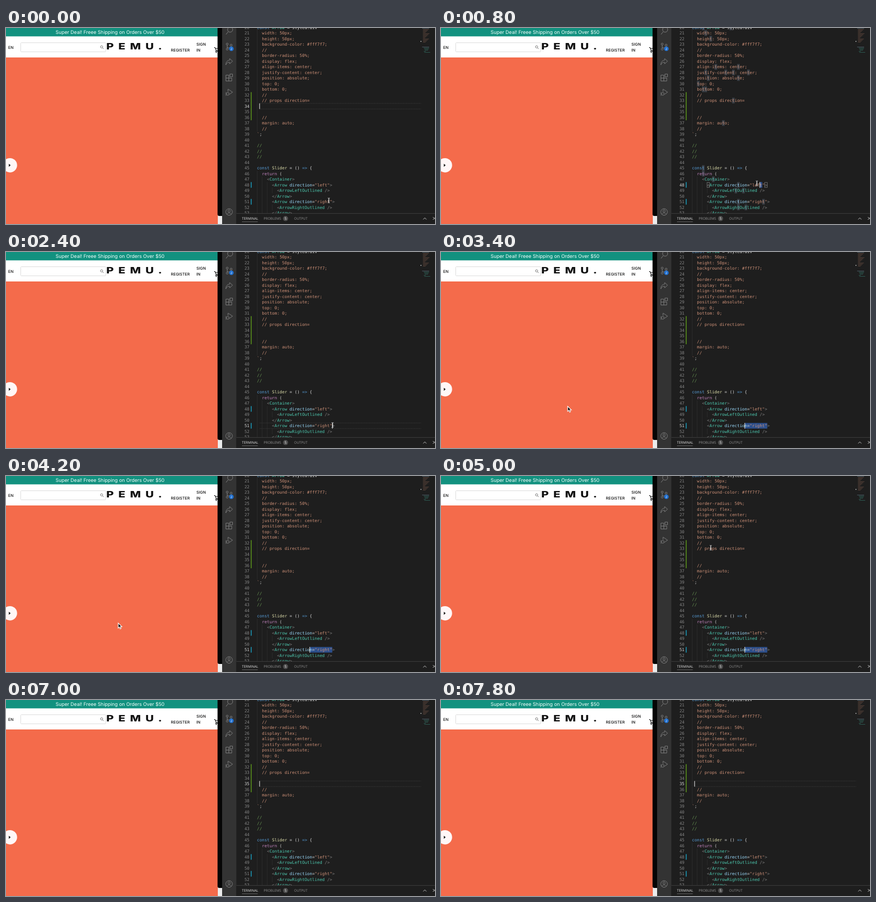
An HTML page that plays this animation: 800 by 366 pixels, repeating every 8000 ms.

```html
<!DOCTYPE html>
<html lang="en">
<head>
<meta charset="utf-8">
<title>Shop slider in the editor</title>
<style>
  html, body { margin: 0; width: 100%; height: 100%; overflow: hidden; background: #1e1e1e; }
  svg { display: block; width: 100vw; height: 100vh; }
  text { white-space: pre; text-rendering: geometricPrecision; }
  .ui { font-family: Inter, sans-serif; font-size: 7.3px; font-weight: 500; fill: #111; }
  .code { font-family: "DejaVu Sans Mono", monospace; font-size: 7.774px; }
  .tab { font-family: "Open Sans", sans-serif; font-size: 6.3px; fill: #969696; }
  .icon { fill: none; stroke: #7c7c7c; stroke-width: 1; stroke-linejoin: round; }
</style>
</head>
<body>
<svg viewBox="0 0 800 366" preserveAspectRatio="none">
  <g id="shop">
    <rect width="395" height="366" fill="#f46b4b"/>
    <rect width="395" height="55" fill="#fff"/>
    <rect width="395" height="15.6" fill="#12917f"/>
    <text class="ui" x="194" y="11.2" text-anchor="middle" style="font-size:9px;font-weight:400;fill:#f4fffc">Super Deal! Freee Shipping on Orders Over $50</text>
    <text class="ui" x="4" y="38.6">EN</text>
    <rect x="27.5" y="27.5" width="158.5" height="17" rx="1" fill="#fff" stroke="#dcdcdc"/>
    <g fill="none" stroke="#777"><circle cx="178.3" cy="35.2" r="2.1"/><path d="M179.9 36.8l2.3 2.3"/></g>
    <text class="ui" transform="translate(187 40) scale(1.3 1)" style="font-size:16.5px;font-weight:800;letter-spacing:6.6px">PEMU.</text>
    <text class="ui" x="307.5" y="44.2">REGISTER</text>
    <text class="ui" x="355" y="32.7">SIGN</text>
    <text class="ui" x="355" y="44.2">IN</text>
    <path d="M388 36.5h1.8l2.2 5.5h4M390.5 38.3h5M392 42l-1 1.7h5" fill="none" stroke="#111" stroke-width="1.1"/>
    <circle cx="392" cy="45.6" r="1" fill="#111"/>
    <circle cx="7.3" cy="256.3" r="13.4" fill="#fff7f7"/>
    <path d="M5.3 253.4v5.8l3.3-2.9z" fill="#111"/>
    <rect x="395" y="340" width="8" height="26" fill="#ececec"/>
    <path d="M394.5 0h8.500v351h-5a3.500 3.500 0 0 1-3.500-3.500z" fill="#050505"/>
  </g>
  <rect x="403" width="27" height="366" fill="#333"/>
  <rect x="429.5" width="371" height="366" fill="#1e1e1e"/>
  <g class="icon">
    <path d="M414.3 7l-4 5"/><circle cx="418" cy="3" r="4.8"/>
    <circle cx="412.5" cy="30" r="1.8"/><circle cx="419.8" cy="32" r="1.8"/><circle cx="412.5" cy="39.5" r="1.8"/>
    <path d="M412.5 32v5.5M419.8 34c0 3-4 3-7.3 3"/>
    <path d="M417 57l5.5 5-5.5 5v-3c-4 0-6 1.5-7 5 0-6 3-8.5 7-9z"/>
    <path d="M410 88h5.5v5.5h5.5v5.5h-11zM410 93.5h5.5v5.5M417.5 86h5v5h-5z"/>
    <path d="M414 119v-5l8.5 5.8-6 4.2"/><circle cx="413.5" cy="123" r="2.6"/>
    <path d="M409.5 120.5l1.8 1M409.5 126l1.8-1M409 123.2h2"/>
    <circle cx="416" cy="343.5" r="6.2"/><circle cx="416" cy="341.7" r="2.2"/><path d="M411.8 348c1-3.600 7.400-3.600 8.400 0"/>
  </g>
  <circle cx="420.3" cy="38.7" r="4.3" fill="#1f6fd0"/>
  <text class="tab" x="420.3" y="40.7" text-anchor="middle" style="font-size:5.5px;fill:#fff">2</text>
  <g id="guides" stroke="#363636" stroke-width=".6"></g>
  <g id="marks"></g>
  <g id="code" class="code"></g>
  <rect id="caret" width="1.2" height="10.5" fill="#d4d4d4"/>
  <g id="map" opacity=".5"></g>
  <rect x="773" y="24" width="1.500" height="2" fill="#aaa"/>
  <g id="panel">
    <rect x="429.5" y="346" width="371" height="20" fill="#1e1e1e"/>
    <path d="M429.5 346.300H800" stroke="#484848" stroke-width=".8"/>
    <text class="tab" x="440" y="358" style="fill:#e7e7e7">TERMINAL</text>
    <path d="M440 361.800h29.500" stroke="#b0b0b0" stroke-width=".5"/>
    <text class="tab" x="480.5" y="358">PROBLEMS</text>
    <circle cx="521.3" cy="355.800" r="4.800" fill="#4d4d4d"/>
    <text class="tab" x="521.3" y="358" text-anchor="middle" style="fill:#fff">5</text>
    <text class="tab" x="537.3" y="358">OUTPUT</text>
    <path d="M778 357.500l3-3 3 3M796 353l5 5M796 358l5-5" fill="none" stroke="#c5c5c5"/>
  </g>
  <path id="beam" d="M-1.8-4.5q1.8 0 1.8 1v7q0 1-1.8 1M1.8-4.5q-1.8 0-1.8 1v7q0 1 1.8 1M-1.1 1h2.2" fill="none" stroke="#d8d8d8" stroke-width=".9"/>
  <path id="arrow" d="M-.8-5v9.600l2.200-2 1.500 3.400 1.700-.7-1.500-3.300h3.100z" fill="#111" stroke="#fff" stroke-width="1.1"/>
</svg>
<script>
const LOOP = 8000, STEP = 200, FIRST = 20;
const X0 = 468, CW = 4.68, LH = 10.5;
const $ = id => document.getElementById(id);
const colX = c => X0 + c * CW;
const midY = n => 9.5 + (n - 21) * LH;
const topY = n => midY(n) - LH / 2;

const lines = `const Arrow = styled.div\`
  width: 50px;
  height: 50px;
  background-color: #fff7f7;
  //
  border-radius: 50%;
  display: flex;
  align-items: center;
  justify-content: center;
  position: absolute;
  top: 0;
  bottom: 0;
  //
  // props direction=


  //
  margin: auto;
  //
\`;

//
//
//

const Slider = () => {
  return (
    <Container>
      <Arrow direction="left">
        <ArrowLeftOutlined />
      </Arrow>
      <Arrow direction="right">
        <ArrowRightOutlined />
      </Arrow>`.split("\n");

function add(parent, tag, attrs, content) {
  const el = document.createElementNS("http://www.w3.org/2000/svg", tag);
  for (const k in attrs) el.setAttribute(k, attrs[k]);
  if (content !== undefined) el.textContent = content;
  parent.appendChild(el);
  return el;
}
const box = (parent, x, y, w, h, fill, more) =>
  add(parent, "rect", { x, y, width: w, height: h, fill, ...more });

function tokenColor(s, n) {
  if (n > 20 && n < 39) return "#ce9178";
  if (/^\/\//.test(s)) return "#6a9955";
  if (/^["`]/.test(s)) return "#ce9178";
  if (/^(const|=>)$/.test(s)) return "#569cd6";
  if (s === "return") return "#c586c0";
  if (s === "direction") return "#9cdcfe";
  if (s === "Slider") return "#dcdcaa";
  if (/^[A-Z]/.test(s)) return "#4ec9b0";
  if (/^[<>\/]/.test(s)) return "#808080";
  return "#d4d4d4";
}

const numbers = lines.map((line, i) => {
  const n = FIRST + i, y = midY(n) + 2.8;
  const text = add($("code"), "text", { x: X0, y });
  const tokens = line.match(/\/\/.*|"[^"]*"|=>|<\/?|\/?>|\w+|\s+|./g) || [];
  for (const s of tokens) add(text, "tspan", { fill: tokenColor(s, n) }, s);
  return add($("code"), "text", { x: 454, y, "text-anchor": "end" }, n);
});

// Indent guides: column, first line, last line
for (const [c, a, b] of [[0, 20, 38], [0, 46, 53], [2, 47, 53], [4, 48, 53], [6, 49, 49], [6, 52, 52]])
  add($("guides"), "path", { d: `M${colX(c) + .4} ${topY(a)}V${topY(b + 1)}` });
box($("guides"), 456.5, topY(32), 1.6, LH * 5, "#5a911c", { stroke: "none" });
for (const n of [48, 51]) box($("guides"), 456.5, topY(n), 1.6, LH, "#1b97b5", { stroke: "none" });

// Minimap: styles above, component below
for (let r = 0; r < 20; r++) {
  const low = r > 13, y = low ? r * 2 + 7 : r * 2;
  const head = r === 0 || r === 14;
  box($("map"), head ? 776 : low ? 779 + r % 3 : 777.5, y, head ? 13 : 4 + r * 7 % 9, .9,
    head ? "#7f9fb5" : low ? "#3f9d8b" : "#9a6c5a");
}

const path = [
  [0, 602, 322], [600, 600, 291], [800, 589, 290], [1400, 543, 293], [1600, 561, 300],
  [2200, 609, 323], [2400, 609, 323], [2950, 566, 325], [3400, 237, 293], [4000, 184, 287],
  [4400, 236, 272], [5000, 503, 134], [5600, 479, 157], [5800, 479, 157], [6400, 493, 144], [LOOP, 493, 144]
];
function mouseAt(t) {
  const i = path.findIndex(p => p[0] > t), [t0, x0, y0] = path[i - 1], [t1, x1, y1] = path[i];
  const k = (t - t0) / (t1 - t0), e = k * k * (3 - 2 * k);
  return [x0 + (x1 - x0) * e, y0 + (y1 - y0) * e];
}

// Editor states: start, line, anchor column, caret column, drag end column, drag end time
const edits = [
  [0, 34, 1, 1, 1, 0], [600, 48, 28, 28, 27, 800], [800, 48, 28, 27, 16, 1400],
  [2400, 51, 30, 30, 21, 2950], [5800, 35, 1, 1, 1, 5800]
];
function editAt(t) {
  const [start, line, from, a, b, end] = edits.filter(e => e[0] <= t).pop();
  const k = end > start ? Math.min(1, (t - start) / (end - start)) : 1;
  return { line, from, to: Math.round(a + (b - a) * k), since: Math.min(t, end) };
}

function render(t) {
  const { line, from, to, since } = editAt(t), marks = $("marks"), y = topY(line);
  marks.replaceChildren();
  if (from === to) {
    for (const edge of [y, y + LH])
      add(marks, "path", { d: `M473 ${edge}H774`, stroke: "#3a3a3a", "stroke-width": .8, "stroke-dasharray": "2 1" });
  }
  if (from - to === 1) {
    lines.forEach((s, i) => [...s].forEach((ch, c) => {
      if (ch === "t") box(marks, colX(c), topY(FIRST + i), CW, LH, "#3b4047");
    }));
    for (const c of [6, 29])
      box(marks, colX(c), y + .5, CW, LH - 1, "none", { stroke: "#888", "stroke-width": .7 });
  }
  if (from > to) box(marks, colX(to), y, (from - to) * CW, LH, "#2c4f8c");

  const caret = $("caret");
  caret.setAttribute("x", colX(to) - .4);
  caret.setAttribute("y", y);
  caret.style.display = Math.floor((t - since) / 500) % 2 ? "none" : "";
  numbers.forEach((el, i) => el.setAttribute("fill", FIRST + i === line ? "#d6d6d6" : "#858585"));

  const [mx, my] = mouseAt(t), overPage = mx < 430;
  for (const [id, on] of [["arrow", overPage], ["beam", !overPage && t < 7000]]) {
    $(id).setAttribute("transform", `translate(${mx} ${my})`);
    $(id).style.display = on ? "" : "none";
  }
}

let shown = -1;
const begin = performance.now();
function tick() {
  const t = Math.floor((performance.now() - begin) % LOOP / STEP) * STEP;
  if (t !== shown) render(shown = t);
  requestAnimationFrame(tick);
}
tick();
</script>
</body>
</html>
```
